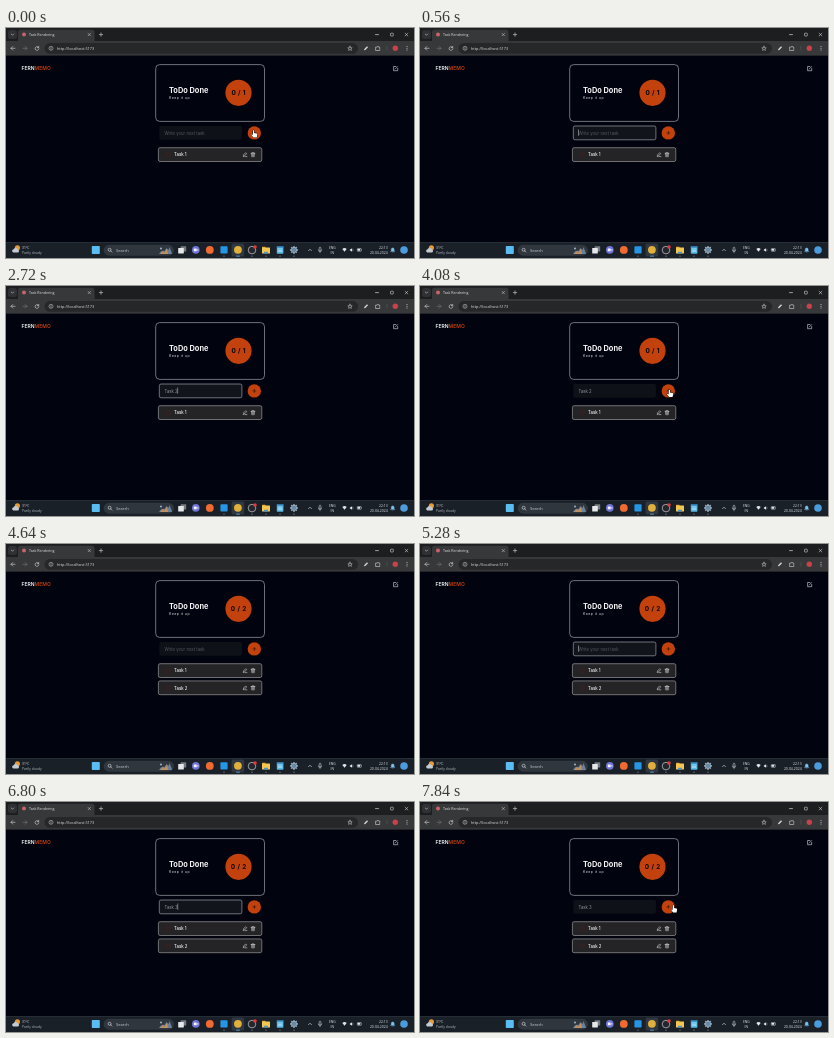
Write an HTML page with a canvas that moves like this. It is 408 by 230 pixels and loops after 8 s.

```html
<!DOCTYPE html>
<html lang="en">
<head>
<meta charset="utf-8">
<title>Task Rendering</title>
<style>
html, body { margin: 0; width: 100%; height: 100%; overflow: hidden; background: #01030e; }
canvas { display: block; width: 408px; height: 230px; }
</style>
</head>
<body>
<canvas id="stage"></canvas>
<script>
const W = 408, H = 230, LOOP = 8000;
const canvas = document.getElementById('stage');
const dpr = window.devicePixelRatio || 1;
canvas.width = W * dpr;
canvas.height = H * dpr;
const ctx = canvas.getContext('2d');

const PAGE = '#01030e', ORANGE = '#c2410c', WHITE = '#f4f4f6';
const UI = '"Open Sans", "Noto Sans", sans-serif';
const APP = 'Inter, Roboto, sans-serif';
const HINT = 'Write your next task';

// time, typed text, focused, caret shown
const FIELD = [
  [0, '', 0, 0], [560, '', 1, 1], [1040, '', 1, 0],
  [1360, 'T', 1, 1], [1600, 'Ta', 1, 1], [1760, 'Tas', 1, 1], [1920, 'Task', 1, 1],
  [2240, 'Task ', 1, 1], [2720, 'Task 2', 1, 1], [3280, 'Task 2', 1, 0],
  [3760, 'Task 2', 1, 1], [4080, 'Task 2', 0, 0], [4240, '', 0, 0],
  [4960, '', 1, 1], [5520, '', 1, 0],
  [5600, 'T', 1, 1], [5760, 'Ta', 1, 1], [6000, 'Tas', 1, 1], [6080, 'Task', 1, 1],
  [6320, 'Task ', 1, 1], [6800, 'Task 3', 1, 1], [7360, 'Task 3', 1, 0],
  [7680, 'Task 3', 0, 0]
];

// time, x, y of the fingertip; no position means hidden
const HAND = [
  [0, 247.6, 102.3], [80, 246.6, 102.6], [160],
  [3840, 250.2, 104.2], [3920, 249.4, 103.8], [4640],
  [7520, 250.4, 103.2], [7600, 250.8, 103.2], [7760, 252, 103.3], [7840, 253.4, 103.4]
];

const at = (track, t) => track.filter(k => k[0] <= t).pop();

function rect(x, y, w, h, r, fill, stroke, lw = 0.6) {
  ctx.beginPath();
  ctx.roundRect(x, y, w, h, r);
  paint(fill, stroke, lw);
}

function disc(x, y, r, fill, stroke, lw = 0.6) {
  ctx.beginPath();
  ctx.arc(x, y, r, 0, Math.PI * 2);
  paint(fill, stroke, lw);
}

function paint(fill, stroke, lw) {
  if (fill) { ctx.fillStyle = fill; ctx.fill(); }
  if (stroke) { ctx.strokeStyle = stroke; ctx.lineWidth = lw; ctx.stroke(); }
}

// SVG path drawn with its own zero at x, y
function shape(x, y, d, fill, stroke, lw = 0.6) {
  ctx.save();
  ctx.translate(x, y);
  const p = new Path2D(d);
  ctx.lineCap = ctx.lineJoin = 'round';
  if (stroke) { ctx.strokeStyle = stroke; ctx.lineWidth = lw; ctx.stroke(p); }
  if (fill) { ctx.fillStyle = fill; ctx.fill(p); }
  ctx.restore();
}

function text(s, x, y, size, color, { font = UI, weight = 400, align = 'left', gap = 0 } = {}) {
  ctx.font = `${weight} ${size}px ${font}`;
  ctx.letterSpacing = gap + 'px';
  ctx.textAlign = align;
  ctx.fillStyle = color;
  ctx.fillText(s, x, y);
  return ctx.measureText(s).width;
}

function browser() {
  const ink = '#d6d7d9', dim = '#77797c', bar = '#37383a';
  rect(0, 0, W, 14, 0, '#1d1e20');
  rect(2, 2, 9, 9, 2.5, '#303134');
  shape(6.5, 6.6, 'M-1.2-.6L0 .6L1.2-.6', null, ink);
  rect(12, 1.8, 76.5, 13, [2.5, 2.5, 0, 0], bar);
  rect(0, 13, W, 14.5, 0, bar);
  disc(18, 6.5, 2, '#c9636b');
  text('Task Rendering', 23, 7.9, 3.6, '#e6e6e8');
  shape(83.3, 6.6, 'M-1.2-1.2L1.2 1.2M1.2-1.2L-1.2 1.2', null, ink, 0.5);
  shape(95, 6.6, 'M-1.7 0H1.7M0-1.7V1.7', null, ink);
  shape(371, 6.6, 'M-1.5 0H1.5', null, WHITE);
  rect(384.5, 5.2, 2.8, 2.8, 0.5, null, WHITE, 0.5);
  shape(400.5, 6.6, 'M-1.4-1.4L1.4 1.4M1.4-1.4L-1.4 1.4', null, WHITE, 0.5);

  const arrow = 'M2 0H-2M-.2-1.8L-2 0L-.2 1.8';
  shape(7, 20.3, arrow, null, ink);
  shape(19, 20.3, 'M-2 0H2M.2-1.8L2 0L.2 1.8', null, dim);
  shape(31, 20.3, 'M1.5-1A1.9 1.9 0 1 0 1.9.4M1.7-2V-.7H.4', null, ink);
  rect(38.5, 15, 313.5, 10.8, 5.4, '#262729');
  disc(45, 20.3, 2, null, ink, 0.5);
  shape(45, 20.3, 'M0-.9V-.8M0 0V1', null, ink, 0.5);
  text('http://localhost:5173', 51, 21.8, 3.85, '#dedfe1');
  shape(344, 20.4, 'M0-2.2L.6-.7L2.2-.6L1 .4L1.4 2L0 1.1L-1.4 2L-1 .4L-2.2-.6L-.6-.7Z', null, ink, 0.5);
  shape(360, 20.3, 'M-2 2L-1.6.6L1 -2L2-1L-.6 1.6Z', ink);
  shape(372, 20.4, 'M-2-1.3H-.7A.7.7 0 0 1 .7-1.3H1.7V0A.7.7 0 0 1 1.7 1.2V2.1H-2Z', null, ink);
  rect(380.7, 18, 0.5, 4.6, 0, '#5c5e61');
  disc(389.3, 20.2, 2.7, '#c9414b');
  for (let i = -1; i < 2; i++) disc(401, 20.3 + i * 1.7, 0.5, ink);
}

function pencil(x, y) {
  shape(x, y, 'M-1.6 1.6L-1.3.2L.8-1.9L1.8-.9L-.3 1.2ZM0 2H2', null, WHITE, 0.5);
}

function trash(x, y) {
  shape(x, y, 'M-2-1.3H2M-.7-1.3V-2.1H.7V-1.3M-1.5-1.3L-1.3 2.1H1.3L1.5-1.3M-.4-.3V1.1M.4-.3V1.1', null, WHITE, 0.45);
}

function item(name, y) {
  rect(152.4, y, 103.4, 13.8, 1.7, '#242427', '#a3a1a3', 0.65);
  disc(162.2, y + 7, 2.2, null, '#571f16', 0.5);
  text(name, 168, y + 8.6, 4.25, WHITE, { font: APP, weight: 500 });
  pencil(238.9, y + 6.9);
  trash(247, y + 6.9);
}

function field([, typed, focused, caret]) {
  rect(153.3, 98, 82.6, 13.8, 1.7, focused ? '#12141b' : '#0f1118',
    focused ? '#a5a8b0' : null, 0.65);
  const width = typed
    ? text(typed, 158.5, 106.5, 4.25, '#93959c', { font: APP })
    : (text(HINT, 158.5, 106.5, 4.25, '#555860', { font: APP }), 0);
  if (caret) rect(158.4 + width, 101.6, 0.5, 6.2, 0, '#d5d6da');
}

function page(t) {
  const two = t >= 4240;
  rect(0, 27.5, W, 187, 0, PAGE);
  const w = text('FERN', 15.6, 42.3, 5, WHITE, { font: APP, weight: 600 });
  text('MEMO', 15.6 + w, 42.3, 5, ORANGE, { font: APP, weight: 600 });
  shape(389.6, 40.6, 'M.3-2.1H-2V2.1H2.1V-.2M-.4.4L2-2', null, WHITE, 0.55);

  rect(149.7, 36.6, 108.8, 56.8, 4, null, '#b9bbc2', 0.6);
  text('ToDo Done', 163, 65.2, 7.4, WHITE, { font: APP, weight: 700 });
  text('Keep it up', 163, 71.4, 3.5, '#dcdde1', { font: APP, gap: 0.46 });
  disc(232.5, 64.8, 13.1, ORANGE);
  text(two ? '0 / 2' : '0 / 1', 232.7, 67.1, 6.4, '#0b0710',
    { font: APP, weight: 700, align: 'center', gap: 0.4 });

  field(at(FIELD, t));
  disc(248.3, 104.9, 6.7, ORANGE);
  shape(248.4, 104.9, 'M-1.5 0H1.5M0-1.5V1.5', null, '#240d0a', 0.55);

  item('Task 1', 119.7);
  if (two) item('Task 2', 136.9);
}

function taskbar() {
  const ink = '#e2e5e9', soft = '#b4b9c0';
  rect(0, 214, W, 16, 0, '#1a2028');
  rect(0, 214, W, 0.5, 0, '#343a42');

  disc(11.4, 219.8, 2.6, '#e59a3c');
  shape(9.6, 222.5, 'M-2.3 2A1.7 1.7 0 0 1-2-1.3A2.2 2.2 0 0 1 2-1.2A1.7 1.7 0 0 1 2.5 2Z', '#c4cad2');
  text('31°C', 16, 220.7, 3.3, ink);
  text('Partly cloudy', 16, 226, 3.3, soft);

  rect(85.8, 218, 8, 8, 0.8, '#5bbcf2');
  rect(98, 217.3, 69.5, 10, 5, '#30363e', '#444a52', 0.4);
  disc(103.6, 221.8, 1.5, null, ink, 0.6);
  shape(103.6, 221.8, 'M1.1 1.1L2.3 2.3', null, ink);
  text('Search', 110, 223.6, 4.1, '#c9cdd2');
  shape(159.5, 226, 'M-6.5 0C-5-3-3-4-1-3L1-6L3-4L4-7L6-2L6.5 0Z', '#6d809a');
  shape(158, 225, 'M-4 1L-1-2L0 0L3-4L4 1Z', '#c38f5c');
  disc(155, 220.5, 1, '#9bb6d0');

  rect(174.6, 218.2, 5.6, 5.4, 0.5, '#777c83');
  rect(172.2, 220, 5.6, 5.4, 0.5, '#e6e7e9');
  disc(189.8, 221.9, 3.8, '#7074d6');
  rect(187.8, 220.5, 2.9, 2.8, 0.5, WHITE);
  shape(191, 221.9, 'M0-.1L1.3-1V1L0 .2Z', WHITE);
  disc(203.8, 221.9, 3.9, '#f06a32');
  rect(214.4, 218.3, 7.2, 7.2, 0.8, '#2595e4');
  rect(225.6, 215.5, 12.6, 13, 1.5, '#303740');
  disc(231.9, 221.8, 3.9, '#dfb03c');
  disc(246, 222.1, 3.8, '#24262b', '#c9ccd0', 0.7);
  disc(249, 219, 1.8, '#e03a3e');
  rect(256, 218.7, 3.6, 2, 0.4, '#d99a25');
  rect(256, 219.6, 8, 6, 0.5, '#f3c551');
  rect(258, 223.7, 4, 1.9, 0.3, '#4a94d4');
  rect(270.8, 218, 6.6, 7.8, 0.7, '#59b9e6');
  rect(270.8, 218, 6.6, 1.5, 0.4, '#2b77ad');
  for (let i = 0; i < 3; i++) rect(272, 220.8 + i * 1.4, 4.2, 0.4, 0, '#e7f5fb');
  ctx.save();
  ctx.translate(288, 221.9);
  for (let i = 0; i < 8; i++) {
    rect(-0.8, -4, 1.6, 2, 0.3, '#8ca2b5');
    ctx.rotate(Math.PI / 4);
  }
  ctx.restore();
  disc(288, 221.9, 2.5, '#64798c', '#a7bbca', 0.8);
  disc(288, 221.9, 0.9, '#4ba5e5');
  for (let i = 0; i < 6; i++) {
    const on = i === 1, w = on ? 4 : 1.6;
    rect(218 + i * 14 - w / 2, 227.7, w, 0.8, 0.4, on ? '#67b8ea' : '#9ba1a8');
  }

  shape(304, 222, 'M-1.5.7L0-.8L1.5.7', null, ink);
  rect(313.2, 219.2, 1.7, 3.6, 0.8, null, ink, 0.5);
  shape(314, 222, 'M-1.7 0A1.7 1.7 0 0 0 1.7 0M0 1.7V2.8', null, ink, 0.45);
  text('ENG', 326.3, 220.7, 3.3, ink, { align: 'center' });
  text('IN', 326.3, 226, 3.3, ink, { align: 'center' });
  shape(338.5, 223.7, 'M0 0L-2.2-2.6A3.1 3.1 0 0 1 2.2-2.6Z', ink);
  shape(345.3, 222, 'M-1.4-.7H-.5L.7-1.8V1.8L-.5.7H-1.4Z', ink);
  shape(345.3, 222, 'M1.5-1A1.6 1.6 0 0 1 1.5 1', null, ink, 0.4);
  rect(351.3, 220.5, 4, 2.8, 0.5, null, ink, 0.5);
  rect(351.8, 221, 2.3, 1.8, 0.2, ink);
  text('22:13', 381.6, 220.7, 3.4, ink, { align: 'right' });
  text('20-04-2024', 381.6, 226, 3.4, ink, { align: 'right' });
  shape(386.7, 222, 'M-2 1.3L-1.4.5V-.7A1.4 1.4 0 0 1 1.4-.7V.5L2 1.3ZM-.5 2H.5', '#79c3ee', '#79c3ee', 0.4);
  disc(398, 222, 3.8, '#4c9bdb');
}

function hand(t) {
  const [, x, y] = at(HAND, t);
  if (x === undefined) return;
  shape(x, y, 'M-.7.2Q0-.5.6.2V2.7L3 3.2Q3.8 3.4 3.7 4.2L3.2 7.2H-.2L-2.3 4.6Q-2.1 3.7-1.3 4.1L-.7 4.7Z',
    '#fff', '#08080b', 0.9);
}

function draw(now) {
  const t = (now - start) % LOOP;
  ctx.setTransform(dpr, 0, 0, dpr, 0, 0);
  page(t);
  browser();
  taskbar();
  hand(t);
}

const start = performance.now();
function tick() {
  draw(performance.now());
  requestAnimationFrame(tick);
}
tick();
</script>
</body>
</html>
```
